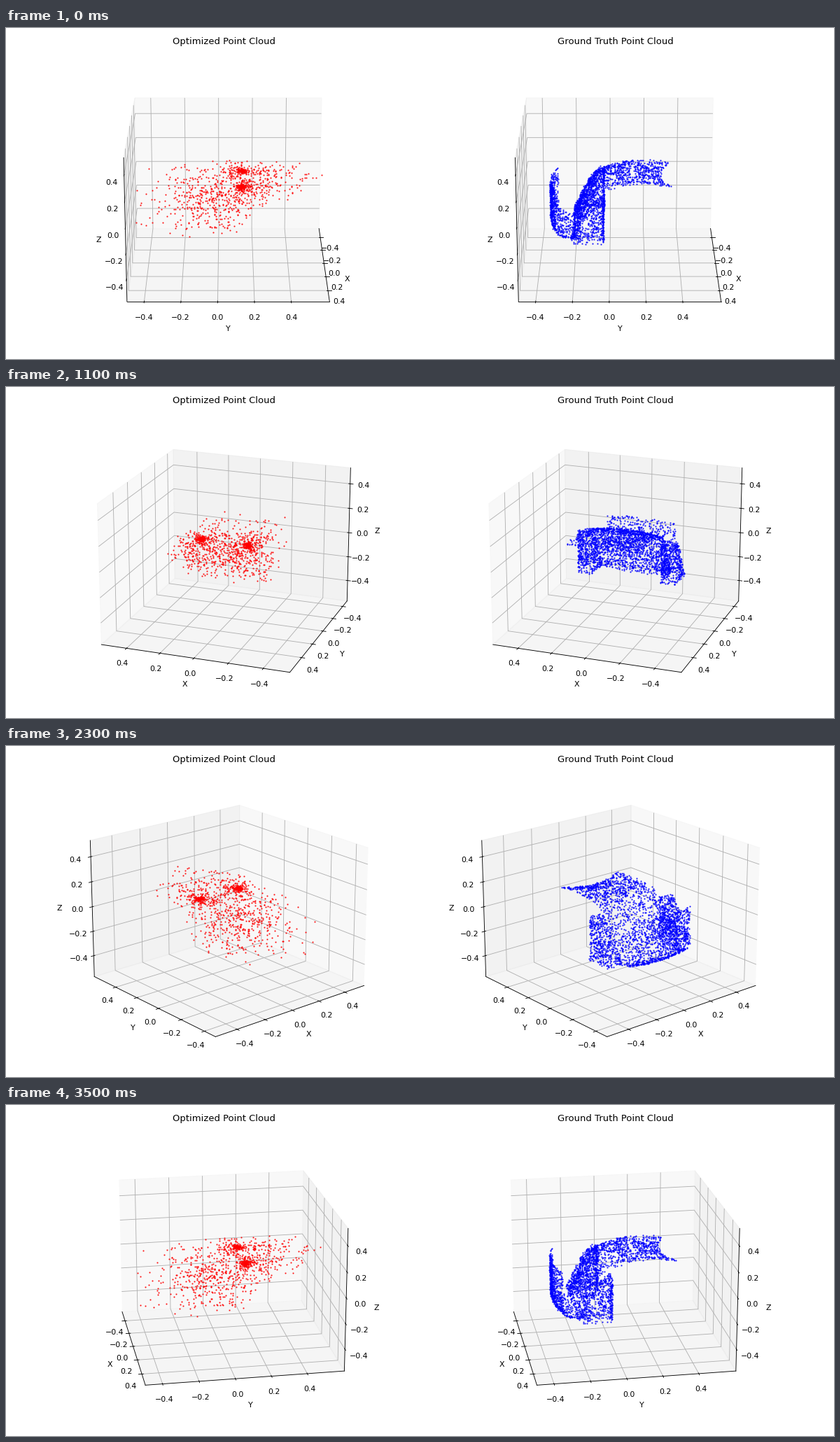
These frames come from a looping animation (1183x473 px, 3600 ms). A matplotlib script:

```python
import numpy as np
import matplotlib.pyplot as plt
from matplotlib.animation import FuncAnimation

WIDTH, HEIGHT, DPI = 1183, 473, 78.87
FRAMES, INTERVAL = 36, 100
ELEVATION = 20
CENTER, HALF_RANGE = (0.001, 0.0576, -0.0224), 0.551
BOX_LEFT, BOX_BOTTOM, BOX_SIZE, BOX_STEP = 96.0, 11.9, 431.5, 559.4

HALF_SEAT, HALF_OUTER = 0.212, 0.296
FRONT_Y, SLOPE_DEPTH = -0.036, 0.175
BASE_Z, ARM_HEIGHT, SEAT_HEIGHT = -0.262, 0.345, 0.40

rng = np.random.default_rng(7)


def unit_pair(count):
    return rng.random(count), rng.random(count)


def across(u):
    """Spread u over the seat width; also give 0 at mid to 1 at the edges."""
    side = 2 * u - 1
    return HALF_SEAT * side, side ** 2


def slope(u):
    return 1 - u ** 1.7


def optimized_cloud():
    """Two tight knots with halos inside a wide, wedge-shaped scatter."""
    parts = []
    for side in (-1, 1):
        knot = (0.138 * side, 0.135, 0.113)
        parts.append(rng.normal(knot, (0.013, 0.017, 0.010), (100, 3)))
        parts.append(rng.normal(knot, (0.040, 0.065, 0.030), (75, 3)))
    count = 660
    x = rng.uniform(-0.23, 0.25, count)
    y = np.clip(rng.normal(0.04, 0.20, count), -0.46, 0.58)
    ahead = np.maximum(y - 0.02, 0)
    low = np.minimum(-0.25 + ahead, 0.06)
    z = rng.uniform(low, 0.14 + 0.15 * ahead) + rng.normal(0, 0.02, count)
    parts.append(np.column_stack([x, y, z]))
    return np.vstack(parts)


def top_sheet(count):
    u, v = unit_pair(count)
    x, edge = across(u)
    y = FRONT_Y + v * (0.326 + 0.06 * edge)
    bend = np.where(y < 0.1, 1.3, 0.9)
    return x, y, 0.165 - bend * (y - 0.1) ** 2 + edge * (0.07 * v - 0.03)


def seat_slope(count):
    u, v = unit_pair(count)
    x, edge = across(u)
    height = SEAT_HEIGHT - 0.03 * edge
    return x, FRONT_Y - SLOPE_DEPTH * v ** 0.7, BASE_Z + height * slope(v ** 0.7)


def end_plate(count):
    u, v = unit_pair(count)
    x, edge = across(u)
    return x, -0.335 + 0.035 * edge, -0.18 + 0.29 * v


def lower_shell(count):
    u, v = unit_pair(count)
    x, edge = across(u)
    angle = v * np.pi / 2
    y = -0.20 - 0.135 * np.cos(angle) + 0.035 * edge * (1 - v)
    return x, y, -0.18 - (0.105 - 0.025 * edge) * np.sin(angle)


def arm(side, count):
    """A block with a rounded slope, closed by two side walls and an end."""
    def place(x, u, height):
        return np.array([side * x, FRONT_Y - SLOPE_DEPTH * u,
                         BASE_Z + ARM_HEIGHT * height])

    walls = []
    for x in (HALF_SEAT, HALF_OUTER):
        u, v = unit_pair(int(0.30 * count))
        u = 1 - u ** 0.65
        walls.append(place(np.full(u.size, x), u, v * slope(u)))
    for rounded in (False, True):
        u, v = unit_pair(int(0.20 * count))
        x = HALF_SEAT + (HALF_OUTER - HALF_SEAT) * v
        walls.append(place(x, u ** 0.7, slope(u ** 0.7)) if rounded
                     else place(x, 0 * u, u))
    return np.hstack(walls)


def truth_cloud():
    surfaces = [top_sheet(640), seat_slope(620), end_plate(420),
                lower_shell(290), arm(-1, 520), arm(1, 520)]
    points = np.hstack([np.array(surface) for surface in surfaces]).T
    return points + rng.normal(0, 0.002, points.shape)


def add_view(index, title, points, color):
    ax = fig.add_axes([(BOX_LEFT + index * BOX_STEP) / WIDTH,
                       BOX_BOTTOM / HEIGHT,
                       BOX_SIZE / WIDTH, BOX_SIZE / HEIGHT], projection="3d")
    ax.scatter(*points.T, c=color, s=1, alpha=0.8, depthshade=False)
    ax.set_title(title)
    for name, middle in zip("xyz", CENTER):
        ax.set(**{
            name + "ticks": np.linspace(-0.4, 0.4, 5),
            name + "lim": (middle - HALF_RANGE, middle + HALF_RANGE),
            name + "label": name.upper(),
        })
    return ax


# The tiny surplus keeps the pixel size from rounding down.
fig = plt.figure(figsize=((WIDTH + 0.01) / DPI, (HEIGHT + 0.01) / DPI),
                 dpi=DPI)
views = [
    add_view(0, "Optimized Point Cloud", optimized_cloud(), "red"),
    add_view(1, "Ground Truth Point Cloud", truth_cloud(), "blue"),
]


def update(frame):
    for ax in views:
        ax.view_init(elev=ELEVATION, azim=frame * 360 / FRAMES)
    return views


animation = FuncAnimation(fig, update, frames=FRAMES, interval=INTERVAL,
                          repeat=True, repeat_delay=0, blit=False)
plt.show()
```
